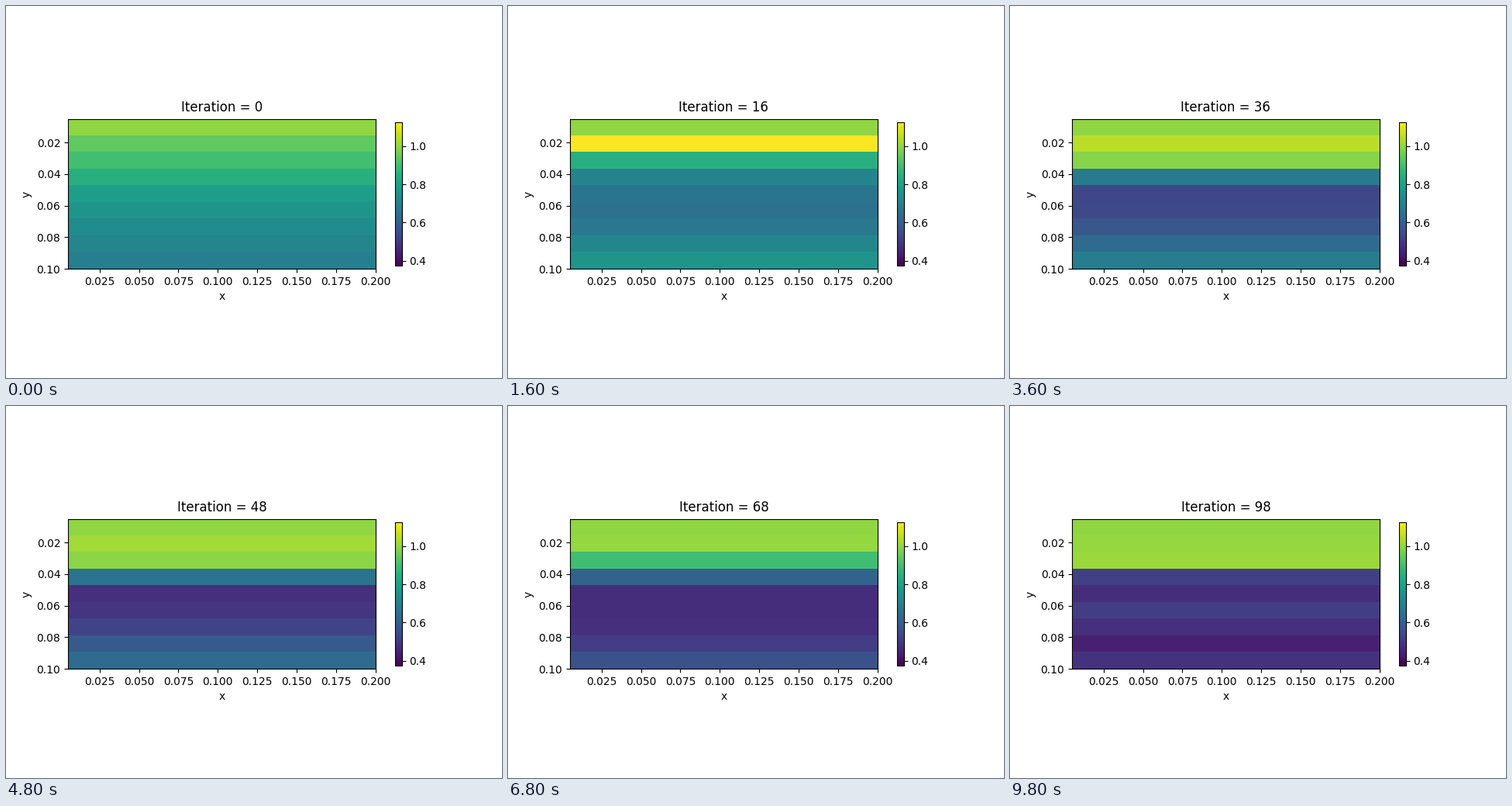
A matplotlib script that plays this animation: 640 by 480 pixels, repeating every 10 s.

```python
import numpy as np
import matplotlib.pyplot as plt
from matplotlib.animation import FuncAnimation

FRAMES, INTERVAL, STEP = 50, 200, 2
VMIN, VMAX = 0.375, 1.125
LAYERS = 9


def surge(t, peak):
    """Rises from 0 to 1 at the peak time, then dies away."""
    return t / peak * np.exp(1 - t / peak)


def bell(t, centre, width):
    return np.exp(-((t - centre) / width) ** 2)


def deep(z, t):
    """Layers that drain one after another, the lowest swelling first."""
    start, floor = 0.32 + 0.51 * np.exp(-z / 5.3), 0.13
    drain = 50 + 3.2 * (z - 4) ** 2
    left = np.clip(1 - t / drain, 0, 1) ** 1.3
    swell = 0.06 * np.maximum(z - 5.5, 0) * surge(t, 20)
    ripple = 0.05 * np.sin(np.pi / 2 * (z - 4)) * np.clip((t - 80) / 18, 0, 1)
    return floor + (start - floor) * left + swell + ripple


def field(t):
    """Level of each layer at iteration t, from the top down."""
    level = deep(np.arange(LAYERS), t)
    level[0] = 0.835
    level[1] = 0.84 + 0.16 * surge(t, 15) ** 2 - 0.085 * np.exp(-t / 5)
    level[2] = 0.85 - 0.235 * bell(t, 11.5, 17.5) - 0.18 * bell(t, 64, 11)
    level[3] = 0.44 - 0.25 * (t / 98) ** 2 + 0.185 * np.exp(-t / 6)
    return VMIN + (VMAX - VMIN) * level[:, None]


fig, ax = plt.subplots(figsize=(6.4, 4.8), dpi=100)
image = ax.imshow(field(0), vmin=VMIN, vmax=VMAX, cmap="viridis",
                  extent=(0.005, 0.2, 0.1, 0.005), interpolation="nearest")
fig.colorbar(image, shrink=0.5)
ax.set_xlabel("x")
ax.set_ylabel("y")
title = ax.text(0.5, 1.05, "", size="large", ha="center",
                transform=ax.transAxes)


def update(i):
    t = i * STEP
    image.set_data(field(t))
    title.set_text(f"Iteration = {t}")
    return image, title


anim = FuncAnimation(fig, update, frames=FRAMES, interval=INTERVAL,
                     repeat=True, repeat_delay=0)
plt.show()
```
